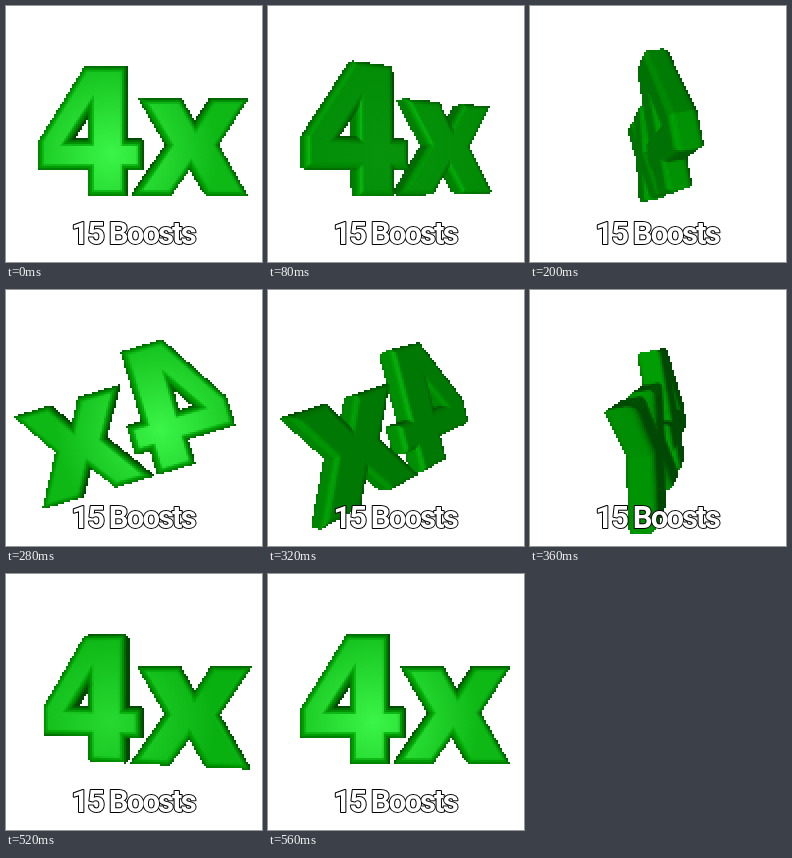
These frames come from a looping animation (256 by 256 pixels, 600 ms). An HTML page with a canvas:

```html
<!DOCTYPE html>
<html lang="en">
<head>
<meta charset="utf-8">
<title>4x</title>
<style>
  html, body { margin: 0; width: 100%; height: 100%; overflow: hidden; background: #fff; }
  canvas, svg { position: absolute; left: 0; top: 0; width: 256px; height: 256px; }
  canvas { image-rendering: pixelated; }
  text {
    font: 700 31px Roboto, "Liberation Sans", sans-serif;
    letter-spacing: -1.9px;
    text-anchor: middle;
    fill: #fff;
    stroke: #000;
    stroke-width: 2px;
    stroke-linejoin: round;
    paint-order: stroke;
  }
</style>
</head>
<body>
<canvas id="stage" width="128" height="128"></canvas>
<svg viewBox="0 0 256 256"><text x="127" y="238">15 Boosts</text></svg>
<script>
const ctx = document.getElementById('stage').getContext('2d', { willReadFrequently: true });
const { sin, cos, abs, max, hypot, floor, round, PI } = Math;

const LOOP = 600, STEP = 40, TURN_STEPS = 14;
const SIZE = 128;
const CX = 128, CY = 128, DIST = 390;
const HALF = 12.5, BEVEL = 6, ARC = 5;
const LEAN = 8.3 * PI / 180, LS = sin(LEAN), LC = cos(LEAN);
const DROP = 0.07;
const LIGHT = [-0.25, 0.15, 0.96];

// Outlines run clockwise, holes counter-clockwise.
const letters = [
  [
    [[78, 60], [121, 60], [121, 134], [137, 134], [137, 164], [121, 164],
     [121, 190], [82, 190], [82, 164], [32, 164], [32, 134]],
    [[82, 108], [65, 134], [82, 134]]
  ],
  [
    [[133, 92], [176, 92], [190, 117], [206, 92], [244, 92], [214, 139],
     [243, 190], [201, 190], [185, 163], [166, 190], [126, 190], [161, 139]]
  ]
].map(loops => loops.map(loop => loop.map(([x, y]) => [x - CX, y - CY])));

// Rounded cross-section from front to back: [z, inset].
const arc = Array.from({ length: ARC + 1 }, (_, k) => {
  const a = k / ARC * PI / 2;
  return [HALF - BEVEL + BEVEL * cos(a), BEVEL * (1 - sin(a))];
});
const profile = [...arc, ...arc.map(([z, inset]) => [-z, inset]).reverse()];

function outNormals(loop) {
  return loop.map(([x, y], i) => {
    const [nx, ny] = loop[(i + 1) % loop.length];
    const len = hypot(nx - x, ny - y);
    return [(ny - y) / len, (x - nx) / len];
  });
}

function insetLoop(loop, normals, inset) {
  return loop.map(([x, y], i) => {
    const a = normals[(i + loop.length - 1) % loop.length], b = normals[i];
    const k = inset / (1 + a[0] * b[0] + a[1] * b[1]);
    return [x - (a[0] + b[0]) * k, y - (a[1] + b[1]) * k];
  });
}

const solids = letters.map(loops => loops.map(loop => {
  const normals = outNormals(loop);
  const rings = profile.map(([z, inset]) =>
    insetLoop(loop, normals, inset).map(([x, y]) => [x, y, z]));
  return { normals, rings };
}));

// Spin about an upright axis leaning in the picture plane.
function spin([x, y, z], angle) {
  const along = -LS * x - LC * y, across = LC * x - LS * y;
  const u = across * cos(angle) + z * sin(angle);
  return [-LS * along + LC * u, -LC * along - LS * u, z * cos(angle) - across * sin(angle)];
}

function place(p, angle) {
  const q = spin(p, angle);
  q[1] += DROP * p[0] * abs(sin(angle));
  return q;
}

function project([x, y, z]) {
  const k = (DIST - HALF) / (DIST - z);
  return [CX + x * k, CY + y * k];
}

const facing = (n, p) => n[0] * -p[0] + n[1] * -p[1] + n[2] * (DIST - p[2]) > 0;
const rgb = (r, g, b) => `rgb(${round(r)},${round(g)},${round(b)})`;

function shade(n, gloss, glow = 0) {
  const lit = max(0, n[0] * LIGHT[0] + n[1] * LIGHT[1] + n[2] * LIGHT[2]);
  const spec = max(0, n[2]) ** 20 * gloss;
  return rgb((14 + 45 * glow) * spec, 72 + 86 * lit + (30 + 60 * glow) * spec, 4 + (18 + 50 * glow) * spec);
}

function trace(points) {
  points.forEach((p, i) => ctx[i ? 'lineTo' : 'moveTo'](...project(p)));
  ctx.closePath();
}

function drawSolid(loops, angle) {
  const quads = [];
  const placed = loops.map(({ rings }) => rings.map(r => r.map(p => place(p, angle))));
  loops.forEach(({ normals }, l) => {
    const rings = placed[l];
    for (let k = 0; k + 1 < rings.length; k++) {
      const dz = profile[k][0] - profile[k + 1][0], di = profile[k][1] - profile[k + 1][1];
      const len = hypot(dz, di);
      normals.forEach(([nx, ny], i) => {
        const j = (i + 1) % normals.length;
        const n = spin([nx * dz / len, ny * dz / len, di / len], angle);
        const points = [rings[k][i], rings[k][j], rings[k + 1][j], rings[k + 1][i]];
        if (!facing(n, points[0])) return;
        const z = points.reduce((sum, p) => sum + p[2], 0);
        quads.push({ points, z, color: shade(n, abs(di / len)) });
      });
    }
  });

  quads.sort((a, b) => a.z - b.z);
  ctx.lineWidth = 0.5;
  for (const { points, color } of quads) {
    ctx.fillStyle = ctx.strokeStyle = color;
    ctx.beginPath();
    trace(points);
    ctx.fill();
    ctx.stroke();
  }

  for (const side of [1, -1]) {
    const n = spin([0, 0, side], angle);
    const caps = placed.map(rings => side > 0 ? rings[0] : rings[rings.length - 1]);
    if (!facing(n, caps[0][0])) continue;
    const [gx, gy] = project(place([-22, 20, HALF * side], angle));
    const fill = ctx.createRadialGradient(gx, gy, 0, gx, gy, 105);
    fill.addColorStop(0, shade(n, 1, 1));
    fill.addColorStop(1, shade(n, 1));
    ctx.fillStyle = ctx.strokeStyle = fill;
    ctx.beginPath();
    caps.forEach(trace);
    ctx.fill('evenodd');
    ctx.stroke();
  }
}

// Hard pixel edges: every pixel is either solid or clear.
function hardenEdges() {
  const image = ctx.getImageData(0, 0, SIZE, SIZE);
  for (let i = 3; i < image.data.length; i += 4) image.data[i] = image.data[i] > 127 ? 255 : 0;
  ctx.putImageData(image, 0, 0);
}

function draw(time) {
  const u = floor(time % LOOP / STEP) / TURN_STEPS;
  const angle = 2 * PI * u - 0.57 * sin(2 * PI * u);
  ctx.setTransform(SIZE / 256, 0, 0, SIZE / 256, 0, 0);
  ctx.clearRect(0, 0, 256, 256);
  // The "4" sits on the left, so it is nearer during the first half turn.
  const order = sin(angle) > 0 ? [1, 0] : [0, 1];
  order.forEach(i => drawSolid(solids[i], angle));
  hardenEdges();
}

const start = performance.now();
function tick(now) {
  draw(max(0, now - start));
  requestAnimationFrame(tick);
}
draw(0);
requestAnimationFrame(tick);
</script>
</body>
</html>
```
